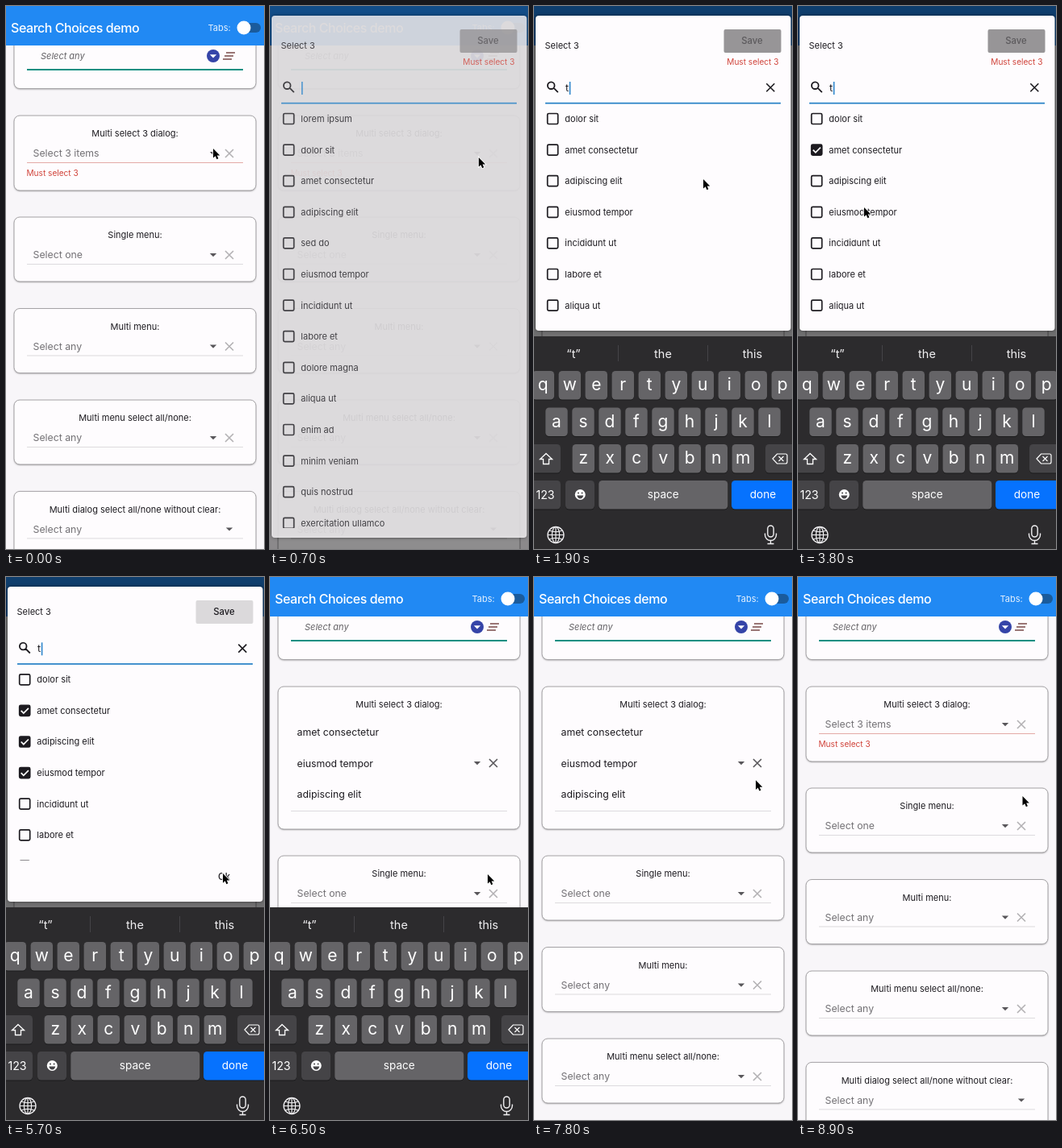
An HTML page with a canvas for the animation above (9000 ms loop, 320 px wide and 674 px high).

```html
<!DOCTYPE html>
<html lang="en">
<head>
<meta charset="utf-8">
<title>Search Choices demo</title>
<style>
html, body { margin: 0; height: 100%; overflow: hidden; background: #f8f6f9; }
canvas { display: block; width: 320px; height: 674px; }
</style>
</head>
<body>
<canvas id="stage" width="320" height="674"></canvas>
<script>
const c = document.getElementById('stage').getContext('2d');
const LOOP = 9000, KB_TOP = 410, KB_H = 264;
const INK = '#1d1b20', RED = '#d0433a', HINT = '#737175';
const WORDS = ['lorem ipsum', 'dolor sit', 'amet consectetur', 'adipiscing elit', 'sed do',
  'eiusmod tempor', 'incididunt ut', 'labore et', 'dolore magna', 'aliqua ut',
  'enim ad', 'minim veniam', 'quis nostrud', 'exercitation ullamco'];
const TYPED = 1800, DONE = 4900, CLEARED = 8400;
// Picked item and the moment it is ticked
const PICKS = { 'amet consectetur': 2800, 'eiusmod tempor': 4000, 'adipiscing elit': DONE };
// Pointer stops: time, x, y
const PATH = [[0, 257, 177], [100, 257.5, 178], [600, 257.5, 178], [1000, 266, 241],
  [1400, 266, 241], [1900, 210, 215], [2100, 147, 193], [2400, 83, 181], [3000, 83, 181],
  [3700, 82, 250], [4200, 82, 250], [4700, 82, 214], [5000, 82, 214], [5600, 269, 368],
  [6600, 270, 369], [7200, 270, 369], [8000, 276, 231], [8500, 276, 231], [8900, 278.5, 272]];

const clamp = v => Math.min(1, Math.max(0, v));
const ramp = (t, a, b) => clamp((t - a) / (b - a));
const smooth = k => k * k * (3 - 2 * k);

function text(s, x, y, size = 11, color = INK, align = 'left', style = '400') {
  c.font = `${style} ${size}px Inter, Roboto, sans-serif`;
  c.textAlign = align;
  c.fillStyle = color;
  c.fillText(s, x, y + size * .36);
}
function rect(x, y, w, h, color) {
  c.fillStyle = color;
  c.fillRect(x, y, w, h);
}
function box(x, y, w, h, r, fill, stroke, width = 1) {
  c.beginPath();
  c.roundRect(x, y, w, h, r);
  paint(fill, stroke, width);
}
function disc(x, y, r, fill, stroke, width) {
  c.beginPath();
  c.arc(x, y, r, 0, 7);
  paint(fill, stroke, width);
}
function paint(fill, stroke, width) {
  if (fill) { c.fillStyle = fill; c.fill(); }
  if (stroke) { c.strokeStyle = stroke; c.lineWidth = width; c.stroke(); }
}
function path(d, x, y, fill, stroke, width) {
  c.save();
  c.translate(x, y);
  const p = new Path2D(d);
  if (stroke) { c.strokeStyle = stroke; c.lineWidth = width; c.stroke(p); }
  if (fill) { c.fillStyle = fill; c.fill(p); }
  c.restore();
}
function clipped(x, y, w, h, draw) {
  c.save();
  c.beginPath();
  c.rect(x, y, w, h);
  c.clip();
  draw();
  c.restore();
}
const cross = (x, y, color) => path('M-5-5 5 5M5-5-5 5', x, y, null, color, 1.6);
const arrow = (x, y, color = '#58565a') => path('M-4.2-2H4.2L0 2.2Z', x, y, color);

function card(y, h, label) {
  c.save();
  c.shadowColor = 'rgba(0,0,0,.35)';
  c.shadowBlur = 2;
  c.shadowOffsetY = 1;
  box(10, y, 300, h, 7, '#fefcfe');
  c.restore();
  box(10, y, 300, h, 7, null, '#a5a3a6');
  text(label, 160, y + 22.3, 11, INK, 'center');
}
function field(y, label, hint, height = 80, line = '#dddbde', clear = true) {
  card(y, height, label);
  text(hint, 33.5, y + 47, 12.3, HINT);
  arrow(clear ? 257 : 277, y + 47);
  if (clear) cross(277, y + 47, '#b3b1b4');
  rect(26, y + 58, 268, 1, line);
}

function page(t) {
  rect(0, 0, 320, 674, '#f8f6f9');
  const chosen = t >= 6300 && t < CLEARED;
  clipped(0, 49, 320, t > 1300 && t < 6880 ? KB_TOP - 49 : 625, () => {
    card(20, 82.5, '');
    text('Select any', 43, 62, 11, '#626064', 'left', 'italic 400');
    rect(26, 78, 268, 2, '#0c8f82');
    disc(257, 62, 8, '#3544a8');
    arrow(257, 62.3, '#fff');
    path('M-3-4H8M-5 0H6M-7 4H4', 276, 62, null, '#7a4a48', 1.7);

    if (chosen) {
      card(136, 177, 'Multi select 3 dialog:');
      Object.keys(PICKS).forEach((s, i) => text(s, 33.5, 192.5 + i * 38.7, 12.3));
      arrow(257, 231);
      cross(277, 231, '#58565a');
      rect(26, 290, 268, 1, '#dddbde');
    } else {
      field(136, 'Multi select 3 dialog:', 'Select 3 items', 93, '#e4aaa6');
      text('Must select 3', 25.5, 207, 10.1, RED);
    }
    const top = chosen ? 346 : 262;
    field(top, 'Single menu:', 'Select one');
    field(top + 113.5, 'Multi menu:', 'Select any');
    field(top + 227, 'Multi menu select all/none:', 'Select any');
    field(top + 340.4, 'Multi dialog select all/none without clear:', 'Select any', 80, '#dddbde', false);
  });
  rect(0, 0, 320, 49, '#2189f3');
  c.letterSpacing = '-0.45px';
  text('Search Choices demo', 6, 27, 16, '#fff', 'left', '500');
  c.letterSpacing = '0px';
  text('Tabs:', 250.5, 27, 11, '#e6f1fd');
  box(289, 21, 27, 12, 6, '#1a5b9c');
  disc(295, 27, 8.5, '#fff');
}

function checkbox(x, y, on) {
  box(x - 6.5, y - 6.5, 13, 13, 1.6, on && INK, INK, 1.7);
  if (on) path('M-4.5 0-1.4 3.2 4.7-3', x, y, null, '#fff', 1.7);
}

function dialog(t) {
  const alpha = ramp(t, 500, 750) * (1 - ramp(t, 6300, 6500));
  if (!alpha) return;
  const done = t >= DONE, typed = t >= TYPED, shift = done ? -12.7 : 0;
  const bottom = 660 - 257 * smooth(ramp(t, 1300, 1600));
  c.save();
  c.globalAlpha = alpha;
  rect(0, 0, 320, 674, 'rgba(0,0,0,.55)');
  c.save();
  c.shadowColor = 'rgba(0,0,0,.5)';
  c.shadowBlur = 4;
  box(2, 12, 316.5, bottom - 12, 4, '#fefcfe');
  c.restore();

  text('Select 3', 13.5, done ? 43.3 : 49.5);
  box(235.5, 29, 71, 29, 2, done ? '#dbd9db' : '#979597');
  text('Save', 270.5, 43.3, 11.3, done ? INK : '#5c5a5d', 'center', '500');
  if (!done) text('Must select 3', 303.5, 69, 10.1, RED, 'right');

  c.translate(0, shift);
  path('M2.2 0A4.3 4.3 0 1 0-6.4 0 4.3 4.3 0 1 0 2.2 0M1 3 6.5 8.5', 23.3, 98.7, null, INK, 1.8);
  if (typed) {
    text('t', 39, 101.5, 12.4);
    cross(293.3, 101.3, INK);
  }
  const phase = (t - (t < 5000 ? 1800 : 4600)) % 1000;
  if (t < 2300 || phase < 500) rect(typed ? 43.8 : 39, 94, 1.6, 16, '#2d86cc');
  rect(14, 119.8, 292, 1.7, '#2580c6');

  const end = bottom - 12 - (done ? 39 : 0) - shift;
  clipped(2, 121, 316, end - 121, () => {
    WORDS.filter(s => !typed || s.includes('t')).forEach((s, i) => {
      const y = 140 + i * 38.6;
      checkbox(23.2, y, t >= PICKS[s]);
      text(s, 38.3, y);
    });
  });
  c.translate(0, -shift);
  if (done) text('Ok', 270.5, 371.8, 11.3, INK, 'center', '500');
  c.restore();
}

function key(x, y, w, label, size = 21, fill = '#656467') {
  box(x - w / 2, y + 1, w, 35.5, 4.5, '#1b1b1c');
  box(x - w / 2, y, w, 35.5, 4.5, fill);
  text(label, x, y + (size > 20 ? 16.5 : 17.5), size, '#fff', 'center');
}

function keyboard(t) {
  if (t < 1180 || t > 6880) return;
  let off = t < 1700 ? KB_H * Math.exp((1180 - t) / 150) : 0;
  if (t > 6650) off = (t - 6650) * 1.187;
  const dark = '#454447';
  c.save();
  c.translate(0, KB_TOP + off);
  rect(0, 0, 320, KB_H, '#2c2b2d');
  rect(104, 11, 1, 20, '#454447');
  rect(215, 11, 1, 20, '#454447');
  const ready = t >= TYPED && t < 6650;
  if (ready) ['“t”', 'the', 'this'].forEach((s, i) => text(s, 49 + i * 111, 22, 14.5, '#f0eff1', 'center'));
  else {
    text('“', 40, 22, 13, '#79787a');
    if (t > TYPED) [150, 260].forEach(x => text('t', x, 22, 13, '#5c5b5d'));
  }

  [...'qwertyuiop'].forEach((s, i) => key(11.3 + i * 33, 43, 27.5, s));
  [...'asdfghjkl'].forEach((s, i) => key(28 + i * 33, 88.5, 27.5, s));
  [...'zxcvbnm'].forEach((s, i) => key(61.3 + i * 33, 134, 27.5, s));
  key(14, 134, 38, '', 14, dark);
  path('M0-7 7.5 0H3.5V6H-3.5V0H-7.5Z', 15, 152.5, null, '#fff', 1.3);
  key(306, 134, 38, '', 14, dark);
  path('M-9 0-3.5-6H7Q9-6 9-4V4Q9 6 7 6H-3.5ZM-1.5-3 4.5 3M4.5-3-1.5 3', 305, 152, null, '#fff', 1.2);
  key(14, 179, 38, '123', 14.2, dark);
  key(57, 179, 36, '', 14, dark);
  disc(57.3, 196.5, 6.5, '#fff');
  disc(55, 194.5, 1, dark);
  disc(59.6, 194.5, 1, dark);
  path('M-4 1H4Q3 5 0 5T-4 1', 57.3, 196.5, dark);
  key(160.3, 179, 160, 'space', 13.6);
  key(285, 179, 80, '', 14, '#0672fe');
  text('done', 284, 196.3, 13.6, '#fff', 'center');

  disc(27, 246.5, 10, null, '#f0eff1', 1.3);
  c.beginPath();
  c.ellipse(27, 246.5, 4.6, 10, 0, 0, 7);
  paint(null, '#f0eff1', 1.2);
  path('M-10 0H10M0-10V10M-8-5.5Q0-2 8-5.5M-8 5.5Q0 2 8 5.5', 27, 246.5, null, '#f0eff1', 1.2);
  box(289.8, 235, 7.4, 14, 3.7, null, '#f0eff1', 1.4);
  path('M-7-1V1A7 7 0 0 0 7 1V-1M0 8V12M-4 12H4', 293.5, 245.5, null, '#f0eff1', 1.4);

  // The panel is paler while it slides
  rect(0, 0, 320, KB_H, `rgba(255,255,255,${.145 * clamp(off / 100)})`);
  c.restore();
}

function pointer(t) {
  let i = PATH.findIndex(p => p[0] > t);
  if (i < 0) i = PATH.length - 1;
  const [t0, x0, y0] = PATH[i - 1], [t1, x1, y1] = PATH[i];
  const k = smooth(ramp(t, t0, t1));
  path('M0 0V11.6L2.7 9.2 4.4 13.2 6.4 12.3 4.7 8.5H8.3Z',
    x0 + (x1 - x0) * k, y0 + (y1 - y0) * k, '#000', '#fff', 1.6);
}

function frame(now) {
  const t = now % LOOP;
  page(t);
  dialog(t);
  keyboard(t);
  pointer(t);
  requestAnimationFrame(frame);
}
requestAnimationFrame(frame);
</script>
</body>
</html>
```
